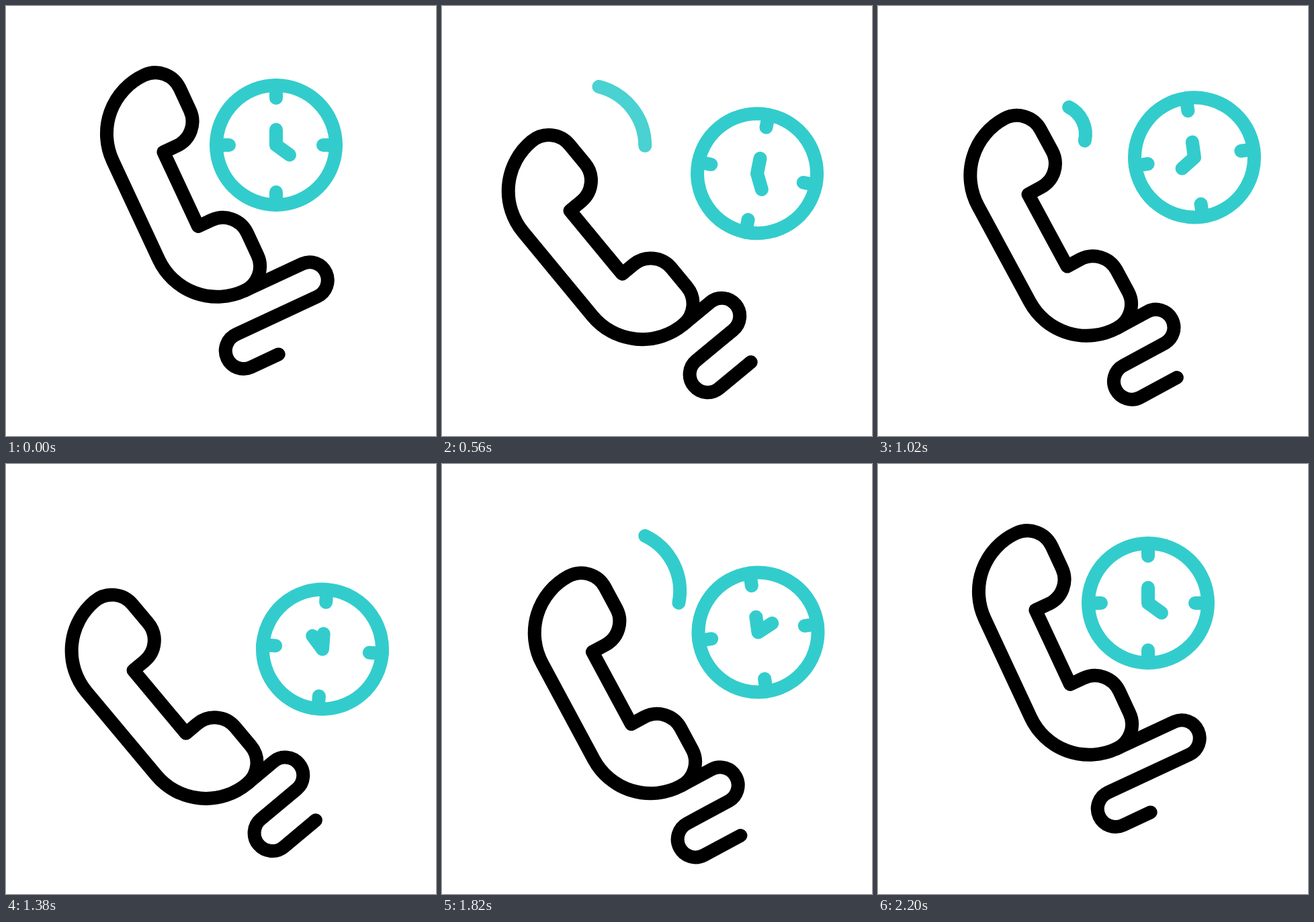
These frames come from a looping animation (640 by 640 pixels, 2.4 s). An HTML page:

```html
<!DOCTYPE html>
<html lang="en">
<head>
<meta charset="utf-8">
<title>Phone and clock</title>
<style>
  html, body { margin: 0; width: 100%; height: 100%; overflow: hidden; background: #fff; }
  svg { display: block; width: 100vw; height: 100vh; }
</style>
</head>
<body>
<svg viewBox="0 0 640 640" fill="none" stroke="#3cc" stroke-width="20" stroke-linecap="round" stroke-linejoin="round">
  <g id="phone">
    <path id="inner" d="M115-207.3A45 45 0 0 1 112-152"/>
    <path id="outer" d="M150.8-237A91 91 0 0 1 147.7-125.3"/>
    <g stroke="#000">
      <path d="M22-238A96 96 0 0 0-74-142V20A96 96 0 0 0 22 116A40 40 0 0 0 62 76V40A40 40 0 0 0 22 0H0V-122H22A40 40 0 0 0 62-162V-198A40 40 0 0 0 22-238Z"/>
      <path id="cord"/>
    </g>
  </g>
  <g id="clock">
    <circle r="89"/>
    <path d="M0-89V-70M0 89V70M-89 0H-70M89 0H70"/>
    <path id="hands"/>
  </g>
</svg>
<script>
const [phone, inner, outer, cord, clock, hands] =
  ["phone", "inner", "outer", "cord", "clock", "hands"].map(id => document.getElementById(id));

const STEP = 20, LOOP = 2400, START = 200, STEPS = 100, PULSE = 33;
const clamp = (v, lo, hi) => Math.min(hi, Math.max(lo, v));
const mix = (a, b, k) => a + (b - a) * k;
const smooth = s => s * s * (3 - 2 * s);
const ramp = (v, from, to) => smooth(clamp((v - from) / (to - from), 0, 1));

// Eased track through keys placed every 20 steps.
function track(step, keys) {
  const i = Math.min(Math.floor(step / 20), keys.length - 2);
  return mix(keys[i], keys[i + 1], smooth(step / 20 - i));
}

// Ease with a longer run-out: cubic-bezier(.333, 0, .833, 1).
function sweep(x) {
  let lo = 0, hi = 1;
  for (let i = 0; i < 30; i++) {
    const p = (lo + hi) / 2, q = 1 - p;
    if (p * q * q + 2.5 * p * p * q + p * p * p < x) lo = p; else hi = p;
  }
  return smooth(lo);
}

function cordPath(out) {
  const right = mix(116.5, 73, out), left = mix(-17, 3.3, out), end = mix(28, 65, out);
  const r = 26.8, y = 116;
  return `M22 ${y}H${right}A${r} ${r} 0 0 1 ${right} ${y + 2 * r}H${left}` +
    `A${r} ${r} 0 0 0 ${left} ${y + 4 * r}H${end}`;
}

function draw(time) {
  const step = clamp(Math.floor((time % LOOP) / STEP + 1e-6) - START / STEP, 0, STEPS);
  const out = track(step, [0, 1, 1, 1, 1, 0]);

  const tilt = track(step, [25, 40, 28.3, 40, 28.3, 25]);
  phone.setAttribute("transform",
    `translate(339.8 ${mix(405.5, 461.8, out)}) rotate(${-tilt}) translate(-16 -93)`);
  cord.setAttribute("d", cordPath(out));

  const phase = step % PULSE;
  inner.setAttribute("opacity", ramp(phase, 3, 7) * (1 - ramp(phase, 10, 14)));
  outer.setAttribute("opacity", ramp(phase, 11, 14.5) * (1 - ramp(phase, 17.2, 21)));

  const x = mix(402, 471, out);
  const y = track(step, [207, 250.5, 225, 276, 250.8, 207]);
  const turn = track(step, [0, 11.4, -8, 4.3, -8, 0]);
  clock.setAttribute("transform", `translate(${x} ${y}) rotate(${turn})`);

  const hour = (36 + 360 * sweep(step / STEPS)) * Math.PI / 180;
  hands.setAttribute("d", `M0-23V0L${24.7 * Math.cos(hour)} ${24.7 * Math.sin(hour)}`);
}

const begin = performance.now();
function tick() {
  draw(performance.now() - begin);
  requestAnimationFrame(tick);
}
tick();
</script>
</body>
</html>
```
